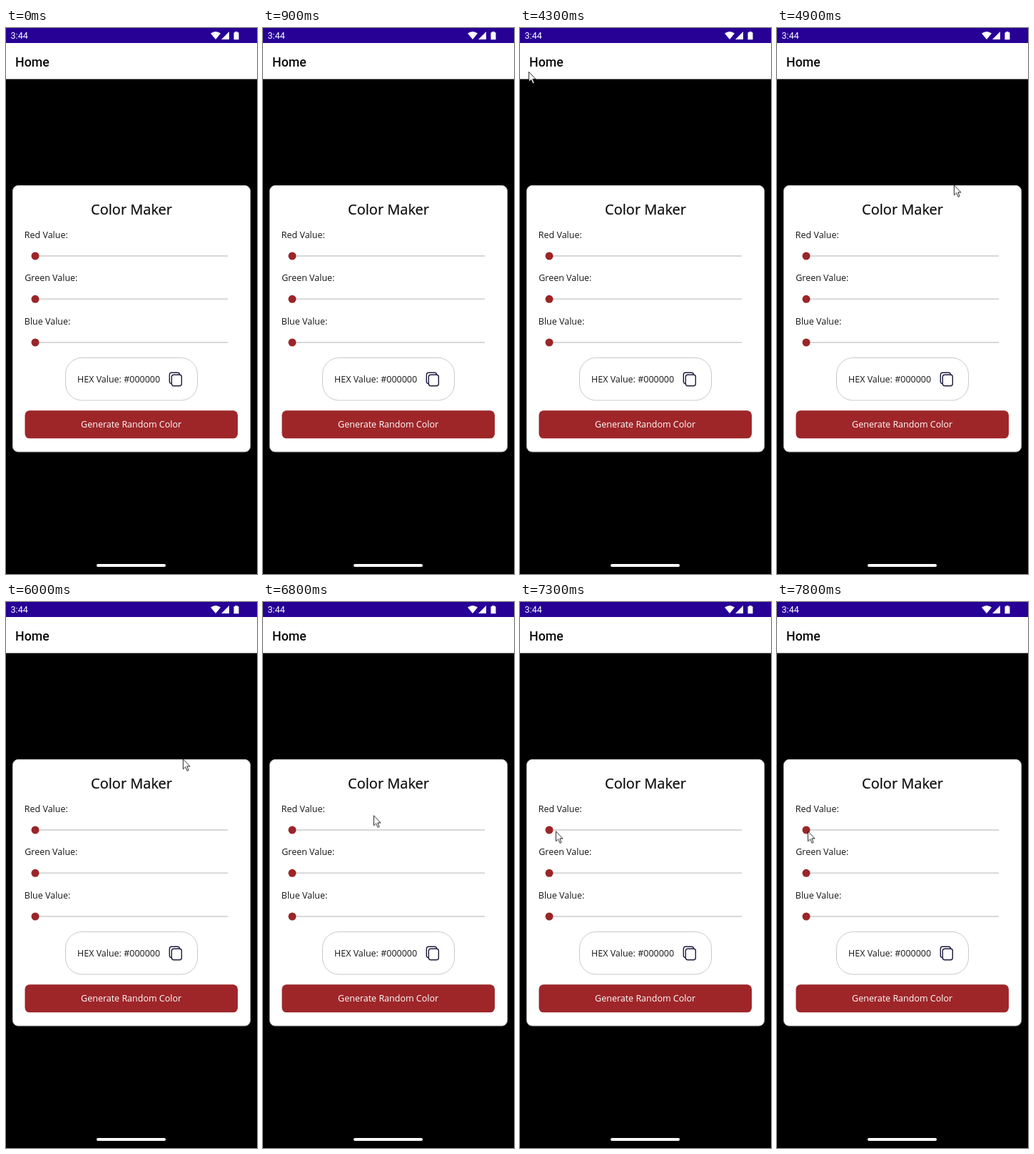
Recreate the animation shown at these times as an HTML page. Size 352 px wide and 764 px high, loop 8 s.

```html
<!DOCTYPE html>
<html lang="en">
<head>
<meta charset="utf-8">
<title>Color Maker</title>
<style>
  html, body { margin: 0; width: 100%; height: 100%; overflow: hidden; background: #000; }
  svg { display: block; width: 352px; height: 764px; }
  text { font: 12.5px "Open Sans", sans-serif; fill: #161616; }
  .bar { font: 12.6px Roboto, sans-serif; fill: #fff; }
  .page { font: 500 17.8px Roboto, sans-serif; fill: #0c0c0c; }
  .title { font-size: 20px; fill: #0c0c0c; stroke: #0c0c0c; stroke-width: .25px; }
  .mid { text-anchor: middle; }
  .light { fill: #fff; }
  .track { stroke: #d8d8d8; stroke-width: 2; animation: tint 8s step-end infinite; }
  .knob { fill: #9b2528; }
  .icon { fill: none; stroke: #1d1b3c; stroke-width: 1.4; stroke-linecap: round; }
  #pointer { animation: move 8s step-end infinite; }

  @keyframes tint {
    0% { stroke: #d8d8d8; }
    37.5%, 100% { stroke: #d7d6cc; }
  }
  @keyframes move {
    0% { transform: translate(-40px, -40px); }
    53.75% { transform: translate(12px, 61px); }
    55% { transform: translate(23px, 44px); }
    56.25% { transform: translate(33px, 30px); }
    61.25% { transform: translate(248px, 219.5px); }
    80% { transform: translate(241px, 248px); }
    81.25% { transform: translate(228px, 277px); }
    85% { transform: translate(155px, 298.5px); }
    86.25% { transform: translate(129px, 302px); }
    87.5% { transform: translate(104px, 305px); }
    88.75% { transform: translate(82px, 311px); }
    90% { transform: translate(63px, 317px); }
    91.25% { transform: translate(50px, 320.5px); }
    92.5% { transform: translate(42px, 320.5px); }
    93.75% { transform: translate(39px, 320.5px); }
    95% { transform: translate(45px, 320.5px); }
    97.5%, 100% { transform: translate(43px, 320.5px); }
  }
</style>
</head>
<body>
<svg viewBox="0 0 352 764">
  <defs>
    <g id="slider">
      <path class="track" d="M41 0H311"/>
      <circle class="knob" cx="41" r="5.5"/>
    </g>
  </defs>

  <rect width="352" height="764"/>
  <rect width="352" height="21.5" fill="#270096"/>
  <rect y="21" width="352" height="50.5" fill="#fff"/>
  <text class="bar" x="6.5" y="15.3">3:44</text>
  <g fill="#fff">
    <path d="M294 16L287 7.6Q294 2.4 301 7.6Z"/>
    <path d="M302 16L313 5V16Z"/>
    <path d="M321.3 5H324.7V6.2H326.5V16.2H319.5V6.2H321.3Z"/>
    <rect x="127" y="750" width="97" height="4" rx="2"/>
  </g>
  <text class="page" x="13" y="53.5">Home</text>

  <rect x="9.5" y="220.5" width="333" height="372.5" rx="7.5" fill="#fff" stroke="#c8c8c8"/>
  <text class="title mid" x="176" y="260.5">Color Maker</text>

  <text x="25.8" y="293.5">Red Value:</text>
  <use href="#slider" y="319"/>
  <text x="26.2" y="354">Green Value:</text>
  <use href="#slider" y="379.3"/>
  <text x="25.8" y="414.5">Blue Value:</text>
  <use href="#slider" y="440"/>

  <rect x="83.5" y="461.5" width="185" height="59.5" rx="23" fill="#fff" stroke="#c9c9c9"/>
  <text x="100" y="496.3">HEX Value: #000000</text>
  <g class="icon">
    <rect x="232.3" y="485.2" width="14" height="15.6" rx="3"/>
    <path d="M231.6 497.6Q229.3 497 229.3 494.4V485.4Q229.3 482.3 232.4 482.3H240.4Q243 482.3 243.6 484.4"/>
  </g>

  <rect x="26.5" y="535.3" width="298.5" height="39" rx="6.5" fill="#9e2629"/>
  <text class="mid light" x="175.6" y="559.4">Generate Random Color</text>

  <g id="pointer">
    <path d="M.4 .4V14.3L3.6 11.3L6 16.8L8.1 15.9L5.8 10.5H10Z" fill="#fff" stroke="#111" stroke-width=".9"/>
  </g>
</svg>
</body>
</html>
```
